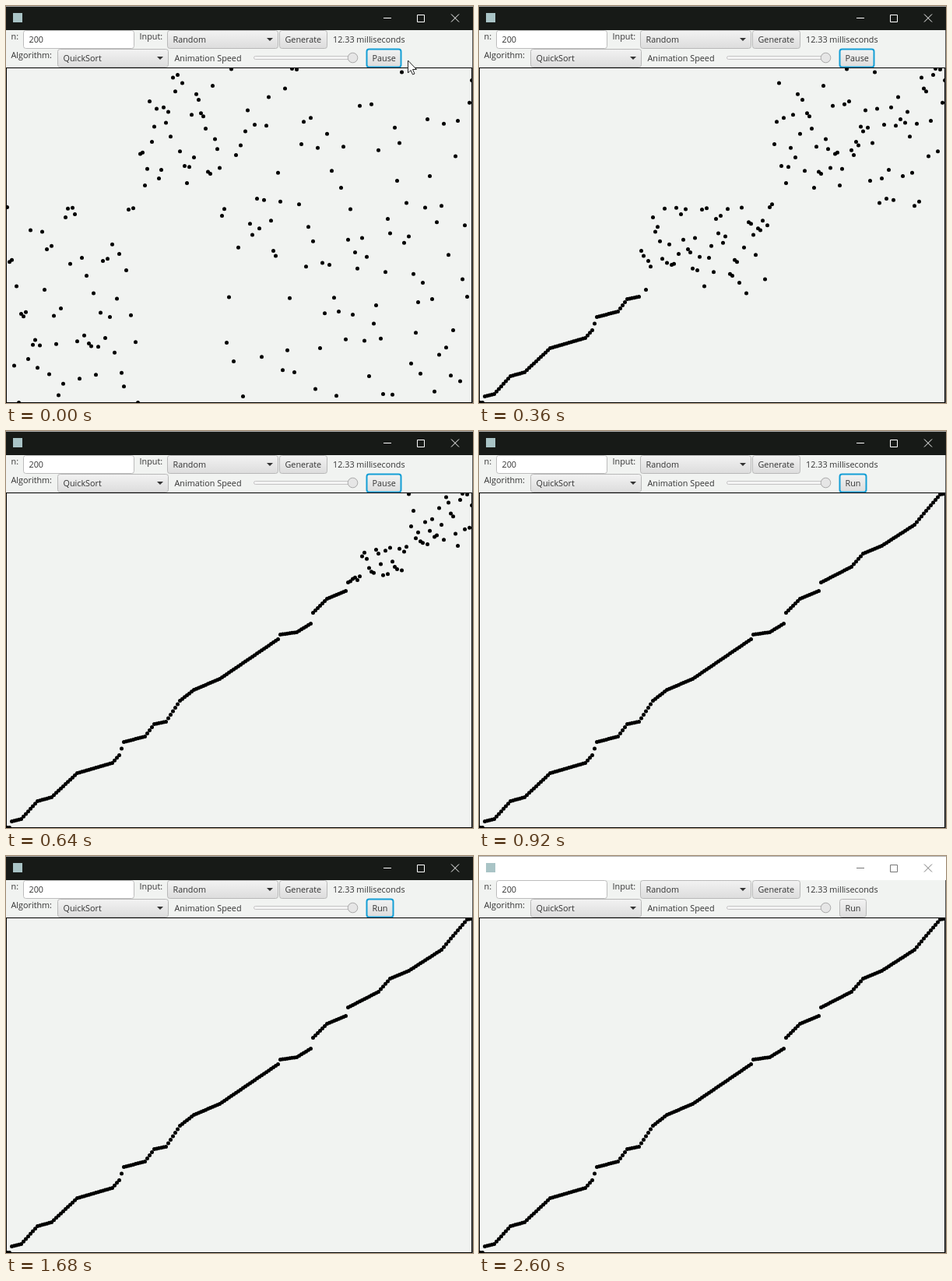
These frames come from a looping animation (600x510 px, 2640 ms). An HTML page with a canvas:

```html
<!DOCTYPE html>
<html>
<head>
<meta charset="utf-8">
<style>
html, body { margin: 0; width: 100%; height: 100%; overflow: hidden; }
canvas { display: block; }
</style>
</head>
<body>
<canvas id="stage" width="600" height="510"></canvas>
<script>
const ctx = document.getElementById('stage').getContext('2d');
const COUNT = 200, LOOP = 2640, TICK = 40, BLUR_AT = 2560, POINTER_UNTIL = 160;
const PANEL = '#f1f3f1', INK = '#333';

// Piecewise linear interpolation through [x, y] points.
function lerp(points, x) {
  const i = points.findIndex(p => p[0] >= x);
  if (i < 0) return points[points.length - 1][1];
  if (i === 0) return points[0][1];
  const [x0, y0] = points[i - 1], [x1, y1] = points[i];
  return y0 + (y1 - y0) * (x - x0) / (x1 - x0);
}

// Bends of the sorted line.
const curve = [
  [4, 509], [7, 501], [19, 498], [40, 475], [58, 470], [91, 439], [136, 426], [145, 416],
  [151, 399], [178, 392], [190, 376], [205, 373], [223, 346], [241, 332], [274, 318], [349, 267],
  [352, 261], [373, 258], [391, 247], [394, 233], [412, 215], [436, 205], [439, 194], [478, 174],
  [493, 157], [517, 147], [559, 120], [574, 102], [592, 81], [598, 80]
];
const dotX = i => 1 + 3 * i;
const range = (from, to) => Array.from({ length: to - from }, (_, i) => from + i);
const heights = range(0, COUNT).map(i => lerp(curve, dotX(i)));

let seed = 7;
function shuffled(list) {
  for (let i = list.length - 1; i > 0; i--) {
    seed = (seed * 16807) % 2147483647;
    const k = seed % (i + 1);
    [list[i], list[k]] = [list[k], list[i]];
  }
  return list;
}

// The first partition is half done: low dots, then high dots, then a mixed rest.
function startOrder() {
  const pivot = 124, lowCount = 56, highCount = 35;
  const fixed = [[125, 126], [127, 171], [197, 68], [198, 184], [199, 193]]; // [index, rank]
  const isLoose = rank => fixed.every(f => f[1] !== rank);
  const lows = shuffled(range(0, pivot).filter(isLoose));
  const highs = shuffled(range(pivot + 1, COUNT).filter(isLoose));
  const rest = shuffled([...lows.slice(lowCount), ...highs.slice(highCount)]);
  const list = [pivot, ...lows.slice(0, lowCount), ...highs.slice(0, highCount), ...rest];
  fixed.forEach(([index, rank]) => list.splice(index, 0, rank));
  return list;
}

// Quicksort, first item as pivot; one step per comparison.
const steps = [];
function quickSort(a, lo, hi) {
  if (lo >= hi) return;
  const swap = (i, k) => { [a[i], a[k]] = [a[k], a[i]]; };
  let mid = lo;
  for (let j = lo + 1; j <= hi; j++) {
    if (a[j] < a[lo]) swap(++mid, j);
    steps.push({ lo, order: a.slice() });
  }
  swap(lo, mid);
  quickSort(a, lo, mid - 1);
  quickSort(a, mid + 1, hi);
}
const order = startOrder();
quickSort(order, 0, COUNT - 1);
steps.push({ lo: COUNT, order });

const reach = lo => steps.findIndex(s => s.lo >= lo);
const clock = [[0, 90], [360, reach(69) + 6], [640, reach(146)], [760, steps.length - 1]];

function text(str, x, y) {
  ctx.fillStyle = INK;
  ctx.font = '10.8px "Open Sans", "Noto Sans", sans-serif';
  ctx.fillText(str, x, y);
}

function box(x, y, w, h, fill, stroke, line = 1) {
  ctx.beginPath();
  ctx.roundRect(x + 0.5, y + 0.5, w - 1, h - 1, 3);
  ctx.fillStyle = fill;
  ctx.fill();
  ctx.strokeStyle = stroke;
  ctx.lineWidth = line;
  ctx.stroke();
}

function path(points, fill, stroke) {
  ctx.beginPath();
  points.forEach(p => ctx.lineTo(...p));
  ctx.closePath();
  ctx.fillStyle = fill;
  ctx.fill();
  if (stroke) {
    ctx.strokeStyle = stroke;
    ctx.lineWidth = 1;
    ctx.stroke();
  }
}

function button(label, x, y, w, focused) {
  const shade = ctx.createLinearGradient(0, y, 0, y + 24);
  shade.addColorStop(0, '#f3f3f3');
  shade.addColorStop(1, '#dcdcdc');
  box(x, y, w, 24, shade, focused ? '#159fd6' : '#b8b8b8', focused ? 2 : 1);
  text(label, x + 7.5, y + 16);
}

function combo(label, x, y) {
  button(label, x, y, 143);
  const cx = x + 132, cy = y + 10;
  path([[cx - 4, cy], [cx + 4, cy], [cx, cy + 4]], INK);
}

function titleBar(active) {
  ctx.fillStyle = active ? '#171a17' : '#fff';
  ctx.fillRect(0, 0, 600, 31);
  ctx.fillStyle = '#b0b0b0';
  ctx.fillRect(0, 0, 600, 1);
  ctx.fillStyle = '#a9c4c6';
  ctx.fillRect(9, 9, 12, 12);
  ctx.strokeStyle = active ? '#fff' : '#777';
  ctx.lineWidth = 1;
  ctx.beginPath();
  ctx.moveTo(485, 15.5); ctx.lineTo(495, 15.5);
  ctx.rect(528.5, 11.5, 9, 9);
  ctx.moveTo(572, 10.5); ctx.lineTo(582, 20.5);
  ctx.moveTo(582, 10.5); ctx.lineTo(572, 20.5);
  ctx.stroke();
}

function toolbar(running, active) {
  text('n:', 6.5, 43);
  box(22, 31, 143, 24, '#fff', '#bcbcbc');
  text('200', 29.5, 47);
  text('Input:', 171.5, 43);
  combo('Random', 207, 31);
  button('Generate', 351, 31, 62);
  text('12.33 milliseconds', 420, 47);
  text('Algorithm:', 6.5, 67);
  combo('QuickSort', 66, 55);
  text('Animation Speed', 216.5, 71);
  box(318, 64, 133, 5, '#f4f4f4', '#c4c4c4');
  ctx.beginPath();
  ctx.arc(445.5, 66.5, 6.3, 0, Math.PI * 2);
  ctx.fillStyle = '#e6e6e6';
  ctx.fill();
  ctx.strokeStyle = '#a9a9a9';
  ctx.stroke();
  if (running) button('Pause', 463, 55, 45, active);
  else button('Run', 463, 55, 35, active);
}

function plot(ranks) {
  ctx.save();
  ctx.beginPath();
  ctx.rect(0, 79, 599, 431);
  ctx.clip();
  ctx.fillStyle = '#000';
  ranks.forEach((rank, i) => {
    ctx.beginPath();
    ctx.arc(dotX(i) + 0.5, heights[rank] + 0.5, 2.5, 0, Math.PI * 2);
    ctx.fill();
  });
  ctx.restore();
  ctx.strokeStyle = '#000';
  ctx.lineWidth = 1;
  ctx.strokeRect(0.5, 79.5, 598, 430);
  ctx.fillStyle = '#555';
  ctx.fillRect(599, 31, 1, 479);
}

function draw(now) {
  const t = Math.floor((now % LOOP) / TICK) * TICK;
  const active = t < BLUR_AT;
  const step = Math.floor(lerp(clock, t));
  ctx.fillStyle = PANEL;
  ctx.fillRect(0, 0, 600, 510);
  titleBar(active);
  toolbar(step < steps.length - 1, active);
  plot(steps[step].order);
  if (t < POINTER_UNTIL) {
    path([[516.5, 70], [516.5, 86], [520, 82.5], [522.5, 88], [525, 87], [522.5, 81.5], [527.5, 81.5]],
      '#fff', '#222');
  }
}

const startTime = performance.now();
function loop() {
  draw(performance.now() - startTime);
  requestAnimationFrame(loop);
}
loop();
</script>
</body>
</html>
```
